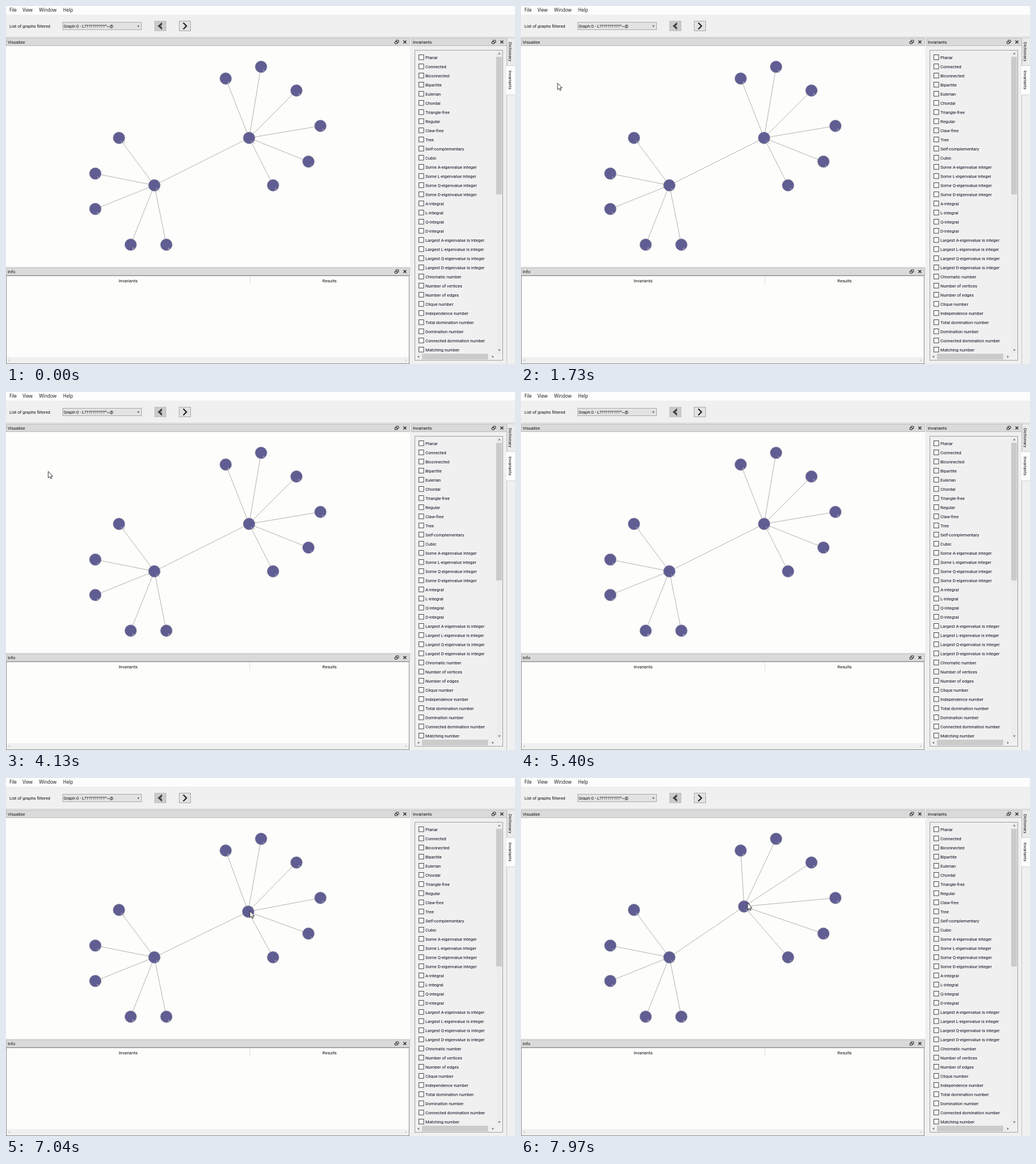
Write an HTML page that moves like this. It is 892 px wide and 627 px high and loops after 8 s.

```html
<!DOCTYPE html>
<html lang="en">
<head>
<meta charset="utf-8">
<title>Graph viewer</title>
<style>
  html, body { margin: 0; width: 100%; height: 100%; overflow: hidden; background: #f0f0f0; }
  svg { display: block; width: 892px; height: 627px; }
  text { font: 7.6px Roboto, "Noto Sans", sans-serif; fill: #111; }
  .menu { font: 8.1px "Open Sans", "Noto Sans", sans-serif; }
  .panel { fill: #0b0b22; }
  .tag { font-size: 7px; fill: #b9b9c4; }
  .mid { text-anchor: middle; }
</style>
</head>
<body>
<svg id="stage" viewBox="0 0 892 627"></svg>
<script>
const stage = document.getElementById('stage');

function add(tag, attrs, content) {
  const el = document.createElementNS('http://www.w3.org/2000/svg', tag);
  for (const key in attrs) el.setAttribute(key, attrs[key]);
  if (content !== undefined) el.textContent = content;
  return stage.appendChild(el);
}
const rect = (x, y, width, height, fill, stroke = 'none') =>
  add('rect', { x, y, width, height, fill, stroke });
const line = (d, stroke = '#444', width = 1) =>
  add('path', { d, stroke, 'stroke-width': width, fill: 'none' });
const label = (x, y, content, cls = '') => add('text', { x, y, class: cls }, content);

// A chevron centred on x, y; dx, dy is the offset of its tip.
function chevron(x, y, dx, dy, stroke = '#444', width = 1) {
  line(`M${x - dx - dy} ${y - dy - dx}L${x + dx} ${y + dy}L${x - dx + dy} ${y - dy + dx}`, stroke, width);
}

function titleBar(x, y, width, title) {
  const right = x + width;
  rect(x + .5, y + .5, width - 1, 13, '#dadada', '#bcbcbc');
  label(x + 3, y + 10, title);
  line(`M${right - 24.5} ${y + 6.5}v-2.5h4.5v4h-2M${right - 26.5} ${y + 6.5}h4v3.5h-4z`, '#222');
  line(`M${right - 11.5} ${y + 4.5}l5 5m0-5l-5 5`, '#222', 1.3);
}

// Menu and toolbar
rect(0, 0, 892, 15, '#fdfdfd');
[[6, 'File'], [29, 'View'], [58, 'Window'], [100, 'Help']].forEach(([x, name]) => label(x, 10.3, name, 'menu'));
label(6, 38, 'List of graphs filtered');
rect(99.5, 28.5, 138, 13, '#e3e3e3', '#a9a9a9');
label(101, 38, 'Graph 0 - L??????????^~@');
chevron(232, 35.2, 0, 1.3);
rect(260.5, 26.5, 20, 17, '#cbcbcb', '#c0c0c0');
chevron(270.5, 35, -2.8, 0, '#3c3c3c', 2);
line('M273.3 29.4L267.7 35L273.3 40.6', '#3c3c3c', 2);
rect(303.5, 26.5, 20, 17, '#e2e2e2', '#a9a9a9');
line('M310.7 29.4L316.3 35L310.7 40.6', '#111', 2);
line('M0 54.5H892', '#c9c9c9');

// Graph panel
titleBar(0, 56, 708, 'Visualize');
rect(0, 70, 708, 386, '#fdfdfc');

// Info panel
titleBar(0, 458, 708, 'Info');
rect(.5, 472.5, 706, 154, '#fdfdfc', '#8c8c8c');
label(214, 484, 'Invariants', 'mid');
label(567, 484, 'Results', 'mid');
line('M427.5 473V488', '#dedede');
rect(1, 615, 705, 11, '#f0f0f0');
chevron(6, 620.5, -1.2, 0, '#bbb');
chevron(701, 620.5, 1.2, 0, '#bbb');

// Invariant list
const invariants = [
  'Planar', 'Connected', 'Biconnected', 'Bipartite', 'Eulerian', 'Chordal', 'Triangle-free',
  'Regular', 'Claw-free', 'Tree', 'Self-complementary', 'Cubic',
  ...[...'ALQD'].map(m => `Some ${m}-eigenvalue integer`),
  ...[...'ALQD'].map(m => `${m}-integral`),
  ...[...'ALQD'].map(m => `Largest ${m}-eigenvalue is integer`),
  'Chromatic number', 'Number of vertices', 'Number of edges', 'Clique number',
  'Independence number', 'Total domination number', 'Domination number',
  'Connected domination number', 'Matching number'
];
titleBar(710, 56, 168, 'Invariants');
rect(716.5, 77.5, 154, 543, '#f0f0f0', '#a0a0a0');
invariants.forEach((name, i) => {
  const y = 90 + 16 * i;
  rect(723.5, y - 4.5, 8.5, 8.5, '#fdfdfd', '#444');
  label(735, y + 2.6, name, 'panel');
});
rect(717, 608, 142, 12, '#efefef');
rect(859, 78, 11, 530, '#ececec');
rect(859, 89, 10, 241, '#cbcbcb');
rect(729, 609, 116, 10, '#cbcbcb');
chevron(864.5, 83.5, 0, -1.3);
chevron(864.5, 602.5, 0, 1.3);
chevron(723, 614.3, -1.3, 0);
chevron(853, 614.3, 1.3, 0);

// Side tabs
line('M877.5 56V627', '#c4c4c4');
rect(878.5, 56.5, 14, 48, '#ebebeb', '#d5d5d5');
rect(877, 105, 15, 50, '#fdfdfd');
line('M877 155.5H892', '#d5d5d5');
[[63, 'Dictionary'], [113, 'Invariants']].forEach(([y, name]) =>
  add('text', { transform: `translate(881 ${y}) rotate(90)` }, name));

// Graph: vertices by index
const HUB = 12;
const vertices = [
  [551, 210], [530, 272.5], [468, 314], [447, 106.5], [385, 127], [509, 148], [281, 418],
  [156.5, 293.5], [218.5, 418], [156.5, 355.5], [198, 231], [260, 314], [426, 231]
];
const edgeColor = '#a9a9a3';
for (let i = 6; i <= 10; i++) line(`M${vertices[11]}L${vertices[i]}`, edgeColor, .9);
const hubEdges = [0, 1, 2, 3, 4, 5, 11].map(i => ({ end: vertices[i], el: line('', edgeColor, .9) }));
const discs = vertices.map(([cx, cy]) =>
  add('circle', { cx, cy, r: 10.3, fill: '#605d93', stroke: '#8e8c9c', 'stroke-width': .7 }));
const tags = vertices.map(([x, y], i) => label(x + 2.5, y + 10, i, 'tag'));

const cursor = add('path', {
  d: 'M0 0V11.5L2.6 9.2L4.4 13L6.2 12.2L4.5 8.5H8Z',
  fill: '#fdfdfd', stroke: '#222', 'stroke-width': .9
});

// Motion: [time, x, y]
const hubPath = [[6950, 426, 231], [7400, 411, 259], [7970, 391, 225]];
const cursorPaths = [
  [[1000, -8, 120], [1600, 64, 135], [1900, 64, 135], [3000, 74, 139], [4300, 74, 139]],
  [[5800, 400, 330], [6340, 459, 340], [6850, 429, 230], [6950, 429, 230], [7400, 414, 258], [7970, 397, 219], [8000, 397, 219]]
];

function at(path, t) {
  if (t <= path[0][0]) return path[0].slice(1);
  const next = path.findIndex(key => key[0] > t);
  if (next < 0) return path[path.length - 1].slice(1);
  const [t0, x0, y0] = path[next - 1], [t1, x1, y1] = path[next];
  const p = (t - t0) / (t1 - t0), k = p * p * (3 - 2 * p);
  return [x0 + (x1 - x0) * k, y0 + (y1 - y0) * k];
}

function move(el, names, point) {
  names.forEach((name, i) => el.setAttribute(name, point[i]));
}

function draw(now) {
  const t = now % 8000;
  const hub = at(hubPath, t);
  hubEdges.forEach(({ end, el }) => el.setAttribute('d', `M${hub}L${end}`));
  move(discs[HUB], ['cx', 'cy'], hub);
  move(tags[HUB], ['x', 'y'], [hub[0] + 2.5, hub[1] + 10]);

  const path = cursorPaths.find(keys => t >= keys[0][0] && t < keys[keys.length - 1][0]);
  cursor.setAttribute('visibility', path ? 'visible' : 'hidden');
  if (path) cursor.setAttribute('transform', `translate(${at(path, t)})`);
  requestAnimationFrame(draw);
}
draw(performance.now());
</script>
</body>
</html>
```
